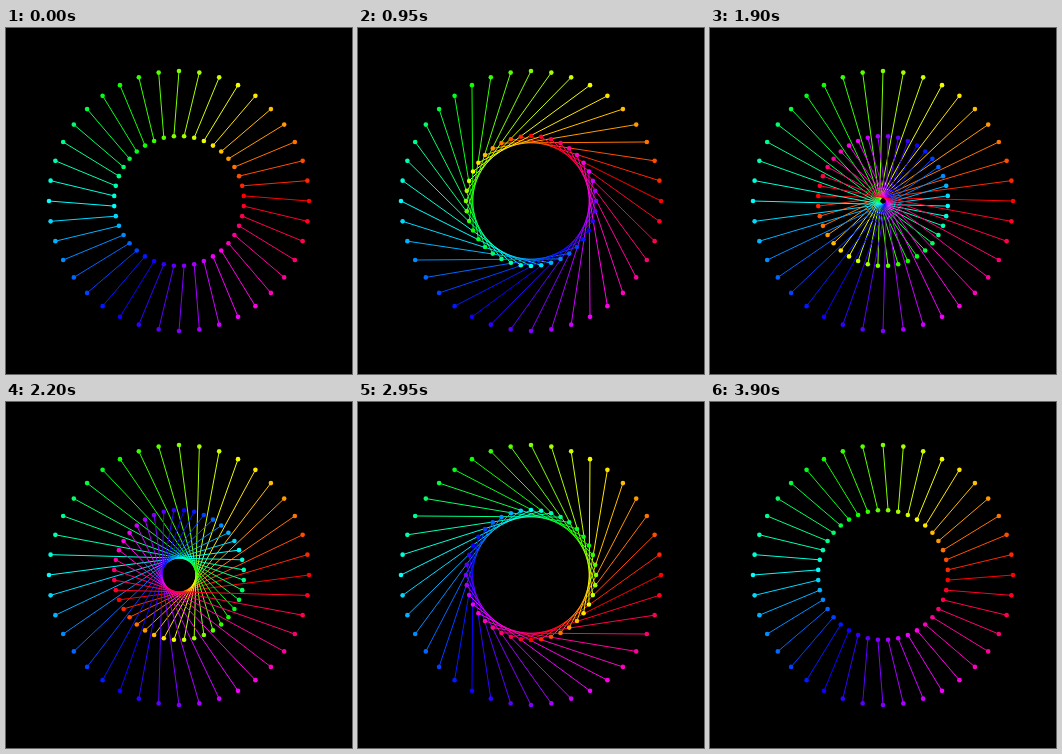
Recreate the animation shown at these times as an HTML page with a canvas. Size 346 px wide and 346 px high, loop 3950 ms.

```html
<!DOCTYPE html>
<html lang="en">
<head>
<meta charset="utf-8">
<title>Turning spokes</title>
<style>
  html, body { margin: 0; width: 100%; height: 100%; overflow: hidden; background: #000; }
  canvas { display: block; width: 346px; height: 346px; }
</style>
</head>
<body>
<canvas id="stage" width="346" height="346"></canvas>
<script>
const SIZE = 346, CENTER = SIZE / 2;
const OUTER = 130, INNER = 65, DOT = 2.3;
const SPOKES = 40, STEPS = 79, STEP_MS = 50, STEP_DEG = 4.5;

const canvas = document.getElementById('stage');
const ctx = canvas.getContext('2d');
const scale = window.devicePixelRatio || 1;
canvas.width = canvas.height = Math.round(SIZE * scale);
ctx.scale(scale, scale);

// Angles run counter-clockwise from the right.
function point(radius, degrees) {
  const a = degrees * Math.PI / 180;
  return [CENTER + radius * Math.cos(a), CENTER - radius * Math.sin(a)];
}

function dot([x, y]) {
  ctx.beginPath();
  ctx.arc(x, y, DOT, 0, 2 * Math.PI);
  ctx.fill();
}

function draw(step) {
  ctx.fillStyle = '#000';
  ctx.fillRect(0, 0, SIZE, SIZE);
  const turn = (step + 1) * STEP_DEG;
  const spokes = Array.from({ length: SPOKES }, (_, i) => {
    const angle = i * 360 / SPOKES;
    return {
      color: `hsl(${angle}, 100%, 50%)`,
      outer: point(OUTER, angle),
      inner: point(INNER, angle + turn)
    };
  });

  ctx.lineWidth = 1;
  for (const { color, outer, inner } of spokes) {
    ctx.strokeStyle = color;
    ctx.beginPath();
    ctx.moveTo(...outer);
    ctx.lineTo(...inner);
    ctx.stroke();
  }
  for (const { color, outer, inner } of spokes) {
    ctx.fillStyle = color;
    dot(outer);
    dot(inner);
  }
}

const start = performance.now();
let shown = 0;
draw(shown);

function tick() {
  const step = Math.floor((performance.now() - start) / STEP_MS) % STEPS;
  if (step !== shown) draw(shown = step);
  requestAnimationFrame(tick);
}
requestAnimationFrame(tick);
</script>
</body>
</html>
```
